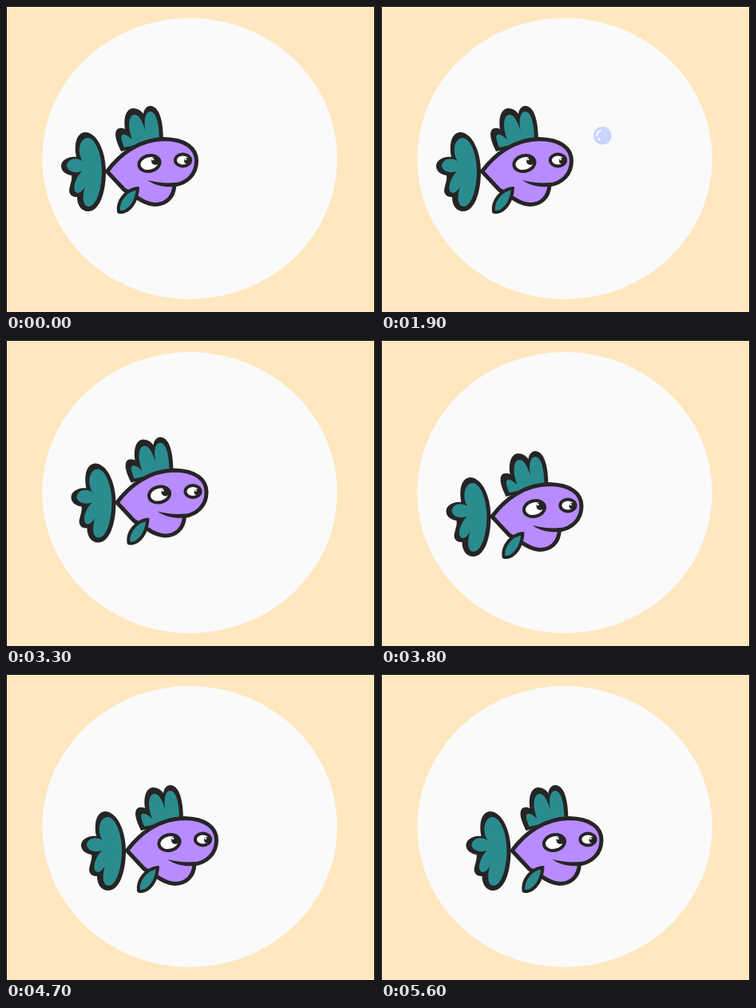
These frames come from a looping animation (462 px wide and 383 px high, 7.2 s). An HTML page:

```html
<!DOCTYPE html>
<html lang="en">
<head>
<meta charset="utf-8">
<title>Fish and bubbles</title>
<style>
  html, body { margin: 0; width: 100%; height: 100%; overflow: hidden; background: #ffe7bf; }
  svg { display: block; width: 462px; height: 383px; }
  .ink { fill: #262425; }
  .teal { fill: #2b8c8f; }
  .line { stroke: #262425; stroke-width: 4; stroke-linejoin: round; stroke-linecap: round; }
  .bold { stroke-width: 5; }
</style>
</head>
<body>
<svg viewBox="0 0 462 383">
  <rect width="462" height="383" fill="#ffe7bf"/>
  <ellipse cx="230" cy="191" rx="184.7" ry="176" fill="#fafafa"/>
  <path d="M.5 383V.5H461.5V383" fill="none" stroke="#000"/>

  <g id="fish">
    <!-- tail -->
    <path class="ink" d="M99 158C114 158 125 182 125 207C125 234 117 257 103 257C94 257 89 249 89 239
      C82 240 77 234 80 226C81 221 83 217 82 212C74 211 69 206 69 200C70 192 79 188 88 189C85 173 88 159 99 158Z"/>
    <path class="teal" d="M102 165C112 165 120 186 120 206C120 230 113 250 104 251C96 251 95 240 99 225
      C96 233 89 237 86 231C84 225 88 214 95 207C86 210 77 207 76 200C77 191 88 189 96 194C89 184 91 166 102 165Z"/>

    <!-- back fin -->
    <path class="ink" d="M144 182C140 173 135 163 138 156C140 152 145 152 149 154C147 140 150 129 159 128
      C165 128 169 131 172 135C173 128 177 125 181 125C194 126 197 150 197 169Z"/>
    <path class="teal" d="M148 177C146 171 142 163 146 161C150 160 154 164 158 167C152 152 153 136 161 136
      C168 136 172 148 175 157C172 143 174 132 181 132C189 133 192 151 192 168Z"/>

    <!-- body -->
    <path class="line bold" fill="#b88cff" d="M126.5 207C142 186 166 167 198 166.5C225 167 238.5 178 238.5 194
      C238.5 211 226 222 211 224C210 240 200 248.5 186 248.5C176 248 169 243 163 239L148 230Z"/>
    <path class="ink" d="M177 218C189 221 200 222 212 221V226C198 227 187 225 177 218Z"/>

    <!-- eyes -->
    <g fill="#fff">
      <ellipse class="line" cx="179.5" cy="197" rx="13.2" ry="9.8" transform="rotate(-14 179.5 197)"/>
      <circle class="ink" cx="187" cy="194" r="5"/>
      <circle cx="184" cy="192" r="1.3"/>
      <ellipse class="line" cx="221.5" cy="193" rx="9.6" ry="7.4"/>
      <circle class="ink" cx="226.8" cy="193.8" r="3.8"/>
      <circle cx="225" cy="192" r="1.2"/>
    </g>

    <!-- side fin -->
    <path class="teal line" d="M165 228C150 230 139 244 141 257.5C144 258.5 149 257.5 151 256C160 250 164 240 165 228Z"/>
  </g>

  <g id="bubble">
    <circle r="11.3" fill="#c9d5ff"/>
    <path d="M-7 0Q-7 -5 -2 -6.5" fill="none" stroke="#fff" stroke-width="2" stroke-linecap="round"/>
    <circle cx="-4.5" cy="4.5" r="1.6" fill="#fff"/>
  </g>
</svg>
<script>
  const LOOP = 7200;
  const steps = [500, 1000, 1400, 1900, 2400, 2800, 3300, 3800, 4200, 4700, 5100, 5600];
  const fish = document.getElementById('fish');
  const bubble = document.getElementById('bubble');

  const place = (el, x, y) => el.setAttribute('transform', `translate(${x} ${y})`);

  function draw(now) {
    const t = now % LOOP;
    const n = steps.filter(s => t >= s).length;

    // Three bubbles rise, two poses each
    const high = n % 2 === 0;
    bubble.setAttribute('visibility', n >= 1 && n <= 6 ? 'visible' : 'hidden');
    place(bubble, high ? 277.3 : 259.3, high ? 162.3 : 196.5);

    // Then three hops forward, up and down
    const hop = Math.max(0, Math.ceil((n - 6) / 2));
    place(fish, hop * 12.5, hop ? (high ? 14 : -3.5) : 0);

    requestAnimationFrame(draw);
  }
  draw(0);
</script>
</body>
</html>
```
